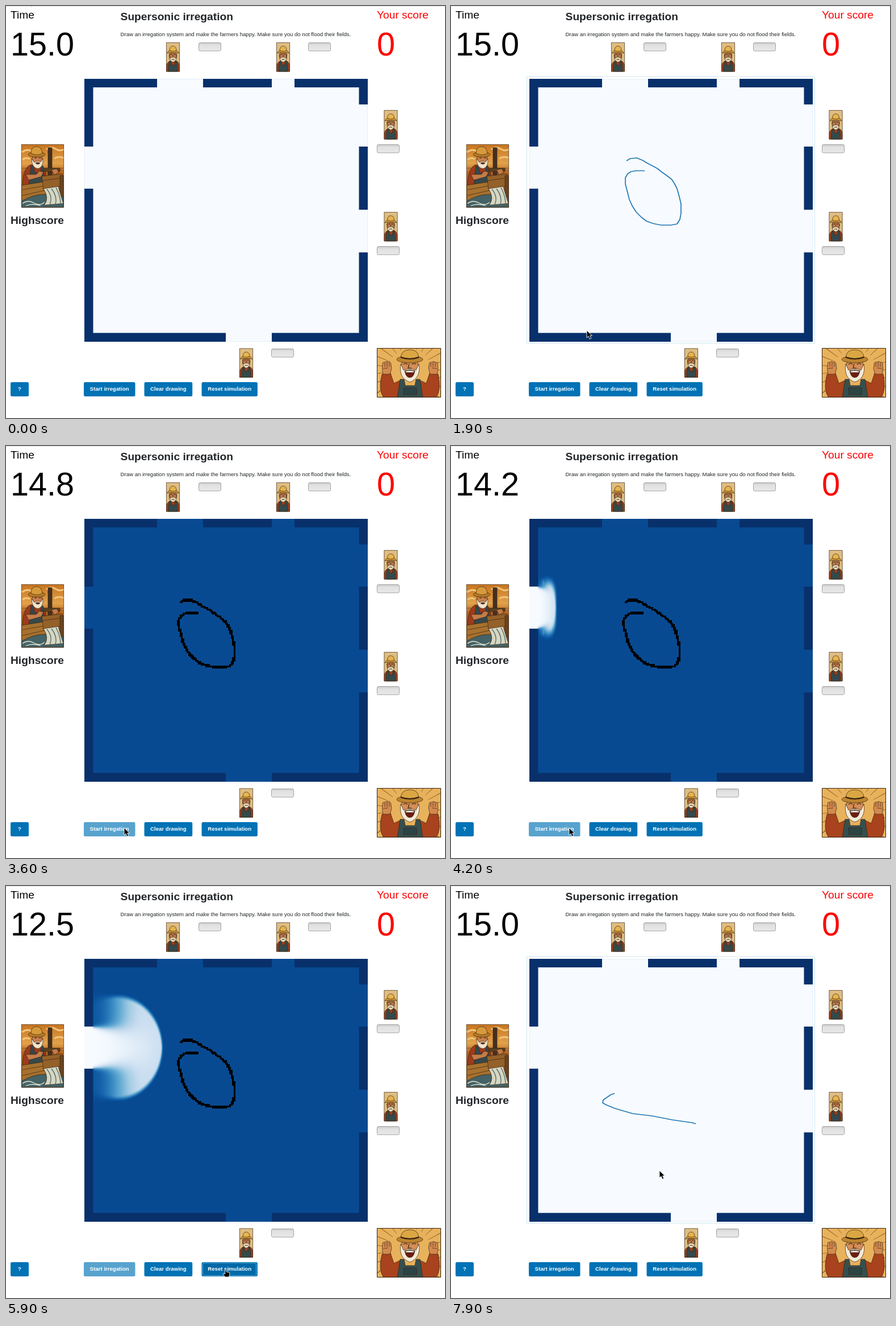
An HTML page with a canvas for the animation above (8 s loop, 773 by 724 pixels).

```html
<!DOCTYPE html>
<html lang="en">
<head>
<meta charset="utf-8">
<title>Supersonic irregation</title>
<style>
  html, body { margin: 0; width: 773px; height: 724px; overflow: hidden; background: #fff; }
  canvas, svg { position: absolute; left: 0; top: 0; display: block; }
  text { font-family: "Liberation Sans", Arial, sans-serif; white-space: pre; }
  .label { font-size: 19.2px; }
  .big { font-size: 57.6px; }
  .head { font-size: 19.2px; font-weight: bold; fill: #212529; }
  .note { font-size: 9.6px; fill: #212529; }
  .btn rect { fill: #0072b5; }
  .btn text { font-size: 9.6px; font-weight: bold; fill: #fff; text-anchor: middle; }
  .btn .ring { fill: #0069a8; stroke: #b5d8ec; stroke-dasharray: 1 1; visibility: hidden; }
  .btn.focus .ring { visibility: visible; }
  .btn.off { opacity: .65; }
  .stroke { fill: none; stroke: #1f77b4; stroke-width: 1.7; stroke-linejoin: round; }
  .art { stroke: #3a2412; stroke-width: .7; stroke-linejoin: round; }
</style>
</head>
<body>
<canvas id="field" width="773" height="724"></canvas>
<svg width="773" height="724" viewBox="0 0 773 724">
  <defs>
    <linearGradient id="inset" x2="0" y2="1">
      <stop offset="0" stop-color="#c9c9c9"/><stop offset=".3" stop-color="#e1e1e1"/><stop offset="1" stop-color="#e8e8e8"/>
    </linearGradient>
    <linearGradient id="sky" x2="0" y2="1">
      <stop offset="0" stop-color="#c8741f"/><stop offset=".3" stop-color="#e2a24c"/><stop offset=".45" stop-color="#b5651f"/><stop offset="1" stop-color="#8a4a18"/>
    </linearGradient>
    <clipPath id="cheerBox"><path d="M0 0H113V87H0Z"/></clipPath>
    <g id="bar"><rect x=".5" y=".5" width="39" height="14.5" rx="2.5" fill="url(#inset)" stroke="#a3a3a3"/></g>
    <g id="farmer" class="art">
      <path d="M.4 .4H23.6V51H.4Z" fill="#dfbd82"/>
      <path d="M.6 51V39Q3 34 8 32H17Q22 34 23.4 39V51Z" fill="#98401f"/>
      <path d="M4 51V42L6 33H8.500L9.500 40H15L16 33H18.500L20 42V51Z" fill="#34494b"/>
      <path d="M6 19H18Q19 29 15 33H9Q5 29 6 19Z" fill="#c07c4a"/>
      <path d="M5.500 21Q4.500 33 12 35Q19.500 33 18.500 21L17 28Q14 25 12 26Q10 25 7 28Z" fill="#e6d8ba"/>
      <path d="M7.500 21.500L10.800 21M13.200 21L16.500 21.500M9.500 30.500Q12 28.500 14.500 30.500M12 22V25" fill="none" stroke-width="1"/>
      <path d="M1.500 19Q3 13.500 12 13.500Q21 13.500 22.500 19Q17 17 12 18Q7 17 1.500 19Z" fill="#d99c33"/>
      <path d="M6 14.500Q6 6.500 12 6.500Q18 6.500 18 14.500Q12 17 6 14.500Z" fill="#e6b44d"/>
    </g>
    <g id="arrow"><path d="M0 0V13L3 10.200L5.200 15.200L7.800 14L5.600 9.300H9.600Z" fill="#000" stroke="#fff" stroke-width=".9"/></g>
    <g id="hand"><path d="M-2 0Q-.7 -1.500 .3 0V4L5 5Q6.500 5.500 6 8L4.500 13H-2.500L-6 8Q-6 6 -4 7L-2.500 8Z" fill="#000" stroke="#fff" stroke-width=".9"/></g>
  </defs>

  <path d="M0 .5H773" stroke="#e4e4e4"/>
  <text class="label" x="8" y="22">Time</text>
  <text class="big" id="clock" x="8" y="87">15.0</text>
  <text class="head" x="201.600" y="25">Supersonic irregation</text>
  <text class="note" x="201.600" y="53">Draw an irregation system and make the farmers happy. Make sure you do not flood their fields.</text>
  <text class="label" x="653" y="22" fill="red">Your score</text>
  <text class="big" x="653" y="87" fill="red">0</text>
  <text class="head" x="8" y="383">Highscore</text>

  <path fill="#08306b" d="M138 128H266V143H153.500V247H138ZM347 128H468V143H347ZM508 128H637V173H621.500V143H508ZM621.500 247H637V358H621.500ZM637 433V590H468V574.500H621.500V433ZM387 590H138V321H153.500V574.500H387Z"/>
  <path id="outline" d="M133.500 124H640.500V592.500H133.500Z" fill="none" stroke="#9fcfe4" stroke-dasharray="1 1"/>

  <g id="people"></g>

  <g class="art" transform="translate(27 243)">
    <path d="M.4 .4H74.600V111H.4Z" fill="url(#sky)"/>
    <path d="M1 14Q10 7 18 12M44 9Q52 3 60 8T74 9M2 27Q9 22 15 26M58 25Q66 20 74 24" fill="none" stroke="#f0c67d" stroke-width="3"/>
    <path d="M1 42H74M56 42L74 58M48 42L74 72M65 42L74 47" fill="none" stroke="#6b3612"/>
    <path d="M2 76Q2 42 16 36L36 37Q46 44 43 70L32 84Z" fill="#9c3b1c"/>
    <path d="M13 75L17 38H21L24 50H34L35 38H38L42 76Z" fill="#35494a"/>
    <ellipse cx="28" cy="25" rx="9" ry="11" fill="#c97f4b"/>
    <path d="M18 25Q18 41 29 43Q39 41 38 25L34 31Q28 28 23 32Z" fill="#efe4cc"/>
    <path d="M25 33Q29 31 33 33Q29 37 25 33Z" fill="#6a1d10"/>
    <path d="M23 24h4m4 0h4" fill="none" stroke-width="1.200"/>
    <ellipse cx="27" cy="18" rx="15" ry="4.500" fill="#b97b27"/>
    <path d="M17 16Q17 4 27 4Q36 4 37 16Q28 21 17 16Z" fill="#d59a3a"/>
    <path d="M47 6H54V56H47Z" fill="#43301f"/>
    <path d="M40 42H68V48H40Z" fill="#59411f"/>
    <path d="M8 53L26 53L32 47L39 49L35 57L13 63ZM53 45L62 43L66 49L58 54Z" fill="#c57b48"/>
    <path d="M.5 72L40 66L44 88L1 103Z" fill="#a8712e"/>
    <path d="M2 80L40 73M2 90L41 81" fill="none"/>
    <path d="M36 56L72 52V73L39 79Z" fill="#946129"/>
    <path d="M37 64L72 59" fill="none"/>
    <path d="M68 55H74V100H68Z" fill="#6a4520"/>
    <path d="M.6 100Q20 88 40 88L74 92V110.600H.6Z" fill="#456266"/>
    <path d="M39 78L65 74Q70 92 74 104L40 107Q50 95 39 78Z" fill="#d8d6c0"/>
    <path d="M2 104Q12 97 22 103T41 102M8 108Q20 103 34 108" fill="none" stroke="#dfe2d0" stroke-width="1.300"/>
    <path d="M45 79Q56 92 50 106M53 78Q64 92 60 106M61 76Q69 91 69 105" fill="none" stroke="#486b70" stroke-width="1.300"/>
  </g>

  <g transform="translate(653 601)" clip-path="url(#cheerBox)">
    <path d="M0 0H113V87H0Z" fill="#e8b25c"/>
    <circle cx="58" cy="38" r="55" fill="none" stroke="#7a4a1c" stroke-width="36" stroke-dasharray=".8 13"/>
    <g class="art">
      <path d="M9 46L24 44L30 62L45 55L44 87H12Q2 74 9 46ZM108 46L93 44L87 62L72 55L73 87H104Q114 74 108 46Z" fill="#a8431d"/>
      <path d="M36 87L41 55H48L50 66H67L69 55H76L81 87Z" fill="#35504f"/>
      <path d="M47 70H70V82H47Z" fill="#2d4445"/>
      <g id="fist">
        <path d="M10 28Q10 24 14 25Q17 22 20 25Q25 24 25 29L26 36L23 46H11Q9 40 10 28Z" fill="#d28a50"/>
        <path d="M14 26V33M18 25V33M22 26V33M11 36L20 35" fill="none"/>
      </g>
      <use href="#fist" transform="matrix(-1 0 0 1 117 0)"/>
      <ellipse cx="58" cy="33" rx="15" ry="18" fill="#d58d55"/>
      <path d="M42 28Q38 53 58 60Q78 53 74 28L69 39Q58 34 47 39Z" fill="#f3ead6"/>
      <path d="M49 40Q58 37 67 40Q65 52 58 52Q51 52 49 40Z" fill="#6d1c10"/>
      <path d="M50 40.500Q58 38.500 66 40.500L65 43H51Z" fill="#fff"/>
      <path d="M47 29Q50 25 54 29M62 29Q66 25 69 29M57 28L55 35H61" fill="none" stroke-width="1.200"/>
      <ellipse cx="58" cy="20" rx="23" ry="6" fill="#bd842f"/>
      <path d="M42 17Q43 3 58 3Q73 3 74 17Q58 23 42 17Z" fill="#dba743"/>
      <path d="M42 16Q58 22 74 16" fill="none" stroke-width="2"/>
    </g>
    <path d="M.5 .5H112.500V86.500H.5Z" fill="none" stroke="#3a2412"/>
  </g>

  <g id="buttons"></g>
  <polyline class="stroke" id="loop" points="309,272 316,268 327,267 337,271 347,277 357,282 364,286 370,291 380,298 389,305 394,313 398,321 402,335 405,348 405,364 403,375 398,383 387,385 370,385 357,382.500 344,378 335,371 326,362 319,351 314,340 311,328 307,313 307,302 311,295 317,291 326,289.500 341,289.500"/>
  <polyline class="stroke" id="hook" points="288,364.500 281,367 268,376 267,381 272,384 289,391 320,400 354,404 390,411 425,416 431,418"/>
  <use id="cursor" href="#arrow"/>
</svg>
<script>
const $ = id => document.getElementById(id);
const ctx = $("field").getContext("2d");

// Farmers and their water gauges: farmer x, y, gauge x, y
const spots = [[282, 64, 339, 64], [476, 64, 532, 64], [665.5, 183, 653, 243], [665.5, 362, 653, 422], [411, 601.5, 467, 602]];
$("people").innerHTML = spots.map(([x, y, bx, by]) =>
  `<use href="#farmer" x="${x}" y="${y}"/><use href="#bar" x="${bx}" y="${by}"/>`).join("");

const buttons = [["?", 8, 32], ["Start irregation", 137, 90.5], ["Clear drawing", 243.5, 84.7], ["Reset simulation", 344.5, 98.4]];
$("buttons").innerHTML = buttons.map(([label, x, w]) =>
  `<g class="btn"><rect x="${x}" y="661" width="${w}" height="25" rx="2.5"/>` +
  `<rect class="ring" x="${Math.round(x) + 1.5}" y="662.5" width="${Math.round(w) - 4}" height="22" rx="2"/>` +
  `<text x="${x + w / 2}" y="676">${label}</text></g>`).join("");
const [, startBtn, clearBtn, resetBtn] = $("buttons").children;

const strokes = [
  { line: $("loop"), from: 1100, to: 1700, gone: 2700 },
  { line: $("hook"), from: 7400, to: 7800, gone: 8000 }
];
for (const s of strokes) s.length = s.line.getTotalLength();

// Cursor path: time, x, y
const path = [
  [200, 39, -14], [300, 62, 18], [600, 215, 165], [900, 302, 264], [1100, 309, 272],
  [1700, 341, 290], [1800, 278, 455], [1900, 239, 570], [2000, 238, 587], [2200, 220, 644],
  [2400, 208, 668], [2600, 208, 668], [2700, 208, 671], [4200, 208, 671], [4600, 258, 673], [4800, 290, 671],
  [4900, 292, 671], [5100, 297, 672], [5500, 365, 675], [5700, 388, 674], [6100, 388, 674],
  [6200, 382, 677], [6600, 292, 676], [7100, 290, 675], [7200, 290, 640], [7300, 289, 490],
  [7400, 288, 364.5], [7800, 431, 418], [7900, 367, 500]
];

function cursorAt(t) {
  for (const { line, length, from, to } of strokes) {
    if (t >= from && t <= to) {
      const p = line.getPointAtLength(length * (t - from) / (to - from));
      return [p.x, p.y];
    }
  }
  const i = path.findIndex(k => k[0] >= t);
  if (i <= 0) return path[0].slice(1);
  const [t0, x0, y0] = path[i - 1], [t1, x1, y1] = path[i], k = (t - t0) / (t1 - t0);
  return [x0 + (x1 - x0) * k, y0 + (y1 - y0) * k];
}

// The drawn loop, snapped to simulation cells
function makeInk() {
  const cell = 2.5, ink = new Path2D(), line = new Path2D();
  for (const p of $("loop").points) line.lineTo(p.x - 3.3, p.y + 3);
  ctx.lineWidth = 4;
  ctx.lineJoin = "round";
  for (let x = 138 + 60 * cell; x < 415; x += cell)
    for (let y = 128 + 52 * cell; y < 400; y += cell)
      if (ctx.isPointInStroke(line, x + cell / 2, y + cell / 2))
        ink.rect(Math.round(x), Math.round(y), 3, 3);
  return ink;
}
const ink = makeInk();

const ramp = [[247, 251, 255], [222, 235, 247], [198, 219, 239], [158, 202, 225], [107, 174, 214],
  [66, 146, 198], [33, 113, 181], [8, 81, 156], [8, 48, 107]];
function blue(v) {
  const k = Math.min(v * 8, 7.999), i = Math.floor(k);
  return ramp[i].map((c, j) => c + (ramp[i + 1][j] - c) * (k - i));
}
const smooth = x => (x = Math.max(0, Math.min(1, x)), x * x * (3 - 2 * x));

// Brightness of the jet, dx from the inner wall and dy from its axis
function jet(dx, dy, d) {
  if (dx < 0) return dy < 37 ? 1 : 0;
  const h = 37 + .45 * d, cx = .34 * d, rx = .66 * d;
  const n = 2 + 1.2 * Math.exp((33 - d) / 18);
  const r = (Math.max(0, (dx - cx) / rx) ** n + (dy / h) ** n) ** (1 / n);
  const soft = 5 + (dx < cx ? 14 * (1 - dx / cx) : 0) + 6 * Math.min(1, dy / h);
  const edge = smooth((1 - r) * (dx < cx ? h : rx) / soft + .25);
  const u = dx / d;
  const core = 1 / (1 + Math.exp((dy - 36 + 10 * u) / (1.2 + .1 * dx)));
  const lobe = .06 + .68 * smooth(u / .75);
  return edge * ((1 - .25 * u ** 1.5) * core + (1 - core) * lobe);
}

function drawWater(s) {
  const d = 144.3 + 61.5 * s - 2.76 * s * s - 153;
  if (d < 2) return;
  const w = 160, h = 270, img = ctx.createImageData(w, h);
  for (let y = 0, i = 0; y < h; y++)
    for (let x = 0; x < w; x++, i += 4) {
      const [r, g, b] = blue(.9 * (1 - jet(x - 14.5, Math.abs(y - 134.5), d)));
      img.data.set([r, g, b, 255], i);
    }
  ctx.putImageData(img, 138, 149);
}

const show = (el, on) => el.style.visibility = on ? "visible" : "hidden";

function render(t) {
  const busy = t >= 2700 && t < 6000, wet = t >= 3600 && t < 6000;

  ctx.fillStyle = wet ? `rgb(${blue(.9).map(Math.round)})` : "#f7fbff";
  ctx.fillRect(138, 128, 499, 462);
  if (wet) drawWater((t - 3500) / 1000);
  else {
    ctx.lineWidth = 1;
    ctx.strokeStyle = "#e6eef7";
    ctx.strokeRect(138.5, 128.5, 498, 461);
  }
  if (t >= 2700 && t < 6800) {
    ctx.fillStyle = "#000";
    ctx.fill(ink);
  }

  const left = t >= 3400 && t < 6000 ? Math.min(14.9, 15 - (t - 3400) / 1000) : 15;
  $("clock").textContent = left.toFixed(1);
  show($("outline"), (t >= 1100 && t < 2700) || t >= 7400);
  startBtn.classList.toggle("off", busy);
  resetBtn.classList.toggle("focus", t >= 5800 && t < 6800);
  clearBtn.classList.toggle("focus", t >= 6800 && t < 7400);

  for (const { line, length, from, to, gone } of strokes) {
    const k = Math.min(1, (t - from) / (to - from));
    show(line, k > 0 && t < gone);
    line.style.strokeDasharray = `${Math.max(0, k) * length} 9999`;
  }

  const [x, y] = cursorAt(t).map(Math.round);
  const over = buttons.findIndex(([, bx, w]) => x >= bx && x < bx + w && y >= 661 && y < 686);
  $("cursor").setAttribute("href", over >= 0 && !(over === 1 && busy) ? "#hand" : "#arrow");
  $("cursor").setAttribute("transform", `translate(${x} ${y})`);
}

let last = -1;
function tick() {
  const t = Math.floor(performance.now() % 8000 / 100) * 100;
  if (t !== last) render(last = t);
  requestAnimationFrame(tick);
}
tick();
</script>
</body>
</html>
```
